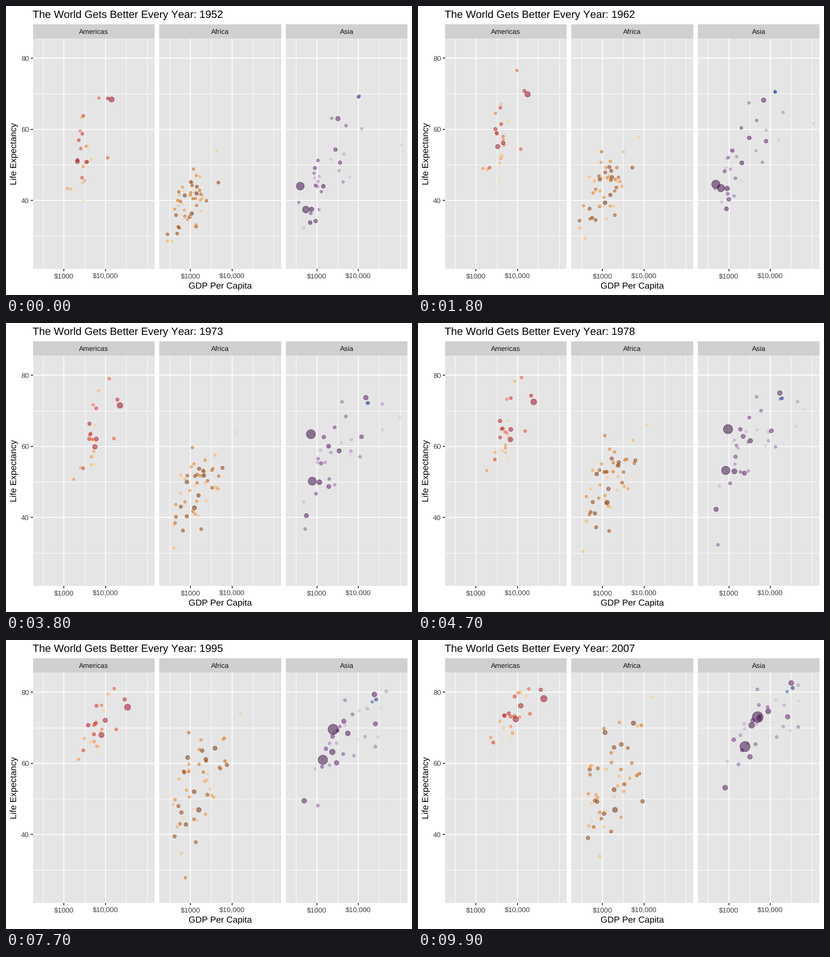
Write a matplotlib script that moves like this. It is 885 px wide and 632 px high and loops after 10000 ms.

```python
import numpy as np
import matplotlib.pyplot as plt
from matplotlib.animation import FuncAnimation
from matplotlib.colors import to_rgb
from matplotlib.patches import Rectangle

W, H, DPI = 885, 632, 64
PT = 72 / DPI  # points per pixel
FRAMES = 100
LEFT, STEP, PANEL_W = 58.5, 275.6, 265.5
TOP, BOTTOM = 71, 575

KEYS = (1952, 1972, 1987, 2007)
WAVES = np.arange(1952, 2008, 5)
time = np.linspace(1952, 2007, FRAMES)
rng = np.random.default_rng(3)

plt.rcParams.update({
    "font.family": "Liberation Sans",
    "text.kerning_factor": 6,
    "text.hinting": "none",
})

# panel index and palette, from most to least populous
AM, AF, AS, OC = range(4)
REGIONS = {
    AM: (0, "#A50026 #D73027 #F46D43 #FDAE61 #FEE090"),
    AF: (1, "#7F3B08 #B35806 #E08214 #FDB863 #FEE0B6"),
    AS: (2, "#40004B #762A83 #9970AB #C2A5CF #E7D4E8"),
    OC: (2, "#313695 #4575B4"),
}


def x_pos(log_gdp, panel=0):
    return 126.3 + STEP * panel + 90.6 * (log_gdp - 3)


def y_pos(life):
    return 425 - 7.768 * (life - 40)


dots = []


def add(region, pops, years, log_gdp, life):
    x = np.interp(time, years, x_pos(log_gdp, REGIONS[region][0]))
    y = np.interp(time, years, y_pos(life))
    r = 2.49 + 9.33 * np.interp(time, (1952, 2007), np.sqrt(np.array(pops) / 1319))
    dots.append((region, pops[1], x, y, r))


def track(region, pops, *points):
    """A dot with its own path through (year, GDP, life) points."""
    years, gdp, life = np.array(points).T
    add(region, pops, years, np.log10(gdp), life)


def drift(n, keep):
    """Standard normal traits that wander a little from wave to wave."""
    z = rng.standard_normal(n)
    rows = []
    for _ in WAVES:
        z = (z - z.mean()) / z.std()
        rows.append(z)
        z = keep * z + np.sqrt(1 - keep ** 2) * rng.standard_normal(n)
    return np.array(rows)


def crowd(region, n, corr, pop, growth, gdp, gdp_sd, life, life_sd, limits):
    """A cloud whose centre, spread and tilt follow the region's trend."""
    def trend(v):
        return np.interp(WAVES, KEYS, v)[:, None]

    u, v = drift(n, 0.98), drift(n, 0.985)
    x = np.clip(trend(gdp) + trend(gdp_sd) * u, *limits)
    y = trend(life) + trend(life_sd) * (corr * u + np.sqrt(1 - corr ** 2) * v)
    y = np.clip(y, 28.5, 82)
    for i in range(n):
        size = 10 ** (np.log10(pop) + 0.45 * rng.standard_normal())
        add(region, (size / growth, size), WAVES, x[:, i], y[:, i])


crowd(AM, 21, 0.55, 8, 2.7, (3.48, 3.69, 3.74, 3.87), (0.2, 0.2, 0.2, 0.25),
      (52.6, 61.8, 67.6, 73.1), (8.6, 7, 5.5, 4), (3.08, 4.3))
crowd(AF, 48, 0.5, 8.5, 3.2, (2.97, 3.15, 3.13, 3.18), (0.26, 0.33, 0.38, 0.43),
      (39.1, 47.5, 53.3, 54.8), (5.2, 6.2, 7.8, 9.4), (2.45, 4.2))
crowd(AS, 27, 0.75, 20, 2.9, (3.22, 3.45, 3.65, 3.8), (0.34, 0.47, 0.48, 0.52),
      (46.5, 57.3, 65, 70.5), (8.6, 9, 7.5, 7.8), (2.52, 4.67))

track(AM, (158, 301), (1952, 13990, 68.4), (1972, 21806, 71.3), (2007, 42952, 78.2))
track(AM, (15, 33), (1952, 11367, 68.7), (1972, 18971, 72.9), (2007, 36319, 80.7))
track(AM, (57, 190), (1952, 2109, 50.9), (1977, 6660, 61.5), (2007, 9066, 72.4))
track(AM, (30, 109), (1952, 3478, 50.8), (1987, 8688, 69.5), (2007, 11978, 76.2))

track(AF, (33, 135), (1952, 1077, 36.3), (1987, 1385, 46.9), (2007, 2014, 46.9))
track(AF, (22, 80), (1952, 1419, 41.9), (1972, 2024, 51.1), (2007, 5581, 71.3))
track(AF, (14, 44), (1952, 4725, 45), (1992, 7225, 61.9), (2007, 9270, 49.3))
track(AF, (2.5, 8.9), (1952, 493, 40), (1982, 882, 46.2), (1992, 737, 23.6), (2007, 863, 46.2))

track(AS, (556, 1319), (1952, 400, 44), (1962, 488, 44.5), (1972, 677, 63.1), (2007, 4959, 73))
track(AS, (372, 1110), (1952, 547, 37.4), (1987, 977, 58.6), (2007, 2452, 64.7))
track(AS, (82, 223), (1952, 750, 37.5), (1972, 1111, 49.2), (2007, 3541, 70.7))
track(AS, (86, 127), (1952, 3217, 63), (1972, 14779, 73.4), (2007, 31656, 82.6))
track(AS, (0.2, 2.5), (1952, 108382, 55.6), (1972, 109348, 67.7), (1987, 28118, 74.2),
      (2007, 47307, 77.6))
track(AS, (4.7, 14), (1952, 368, 39.4), (1967, 523, 45.4), (1977, 525, 31.2), (2007, 1714, 59.7))

track(OC, (8.7, 20.4), (1952, 10040, 69.1), (1972, 16789, 71.9), (2007, 34435, 81.2))
track(OC, (2, 4.1), (1952, 10557, 69.4), (1972, 16046, 71.9), (2007, 25185, 80.2))


def ramp(palette, n):
    stops = np.array([to_rgb(c) for c in palette.split()]) ** 1.22
    at = np.linspace(0, len(stops) - 1, n)
    return np.stack([np.interp(at, range(len(stops)), ch) for ch in stops.T], 1)


def dot_colors():
    """Half-transparent colours, darkest for the largest population."""
    region = np.array([d[0] for d in dots])
    pops = np.array([d[1] for d in dots])
    rgba = np.full((len(dots), 4), 0.5)
    for key, (_, palette) in REGIONS.items():
        mine = np.flatnonzero(region == key)
        order = mine[np.argsort(-pops[mine])]
        rgba[order, :3] = ramp(palette, len(mine))
    return rgba


fig = plt.figure(figsize=(W / DPI, H / DPI), dpi=DPI, facecolor="white")
ax = fig.add_axes([0, 0, 1, 1])
ax.set(xlim=(0, W), ylim=(H, 0))
ax.axis("off")


def rect(x, y, w, h, color):
    ax.add_patch(Rectangle((x, y), w, h, fc=color, lw=0, zorder=0))


def line(x, y, width, color="white"):
    ax.plot(x, y, color=color, lw=width * PT, solid_capstyle="butt", zorder=1)


def label(x, y, s, size, color="black", ha="center", **kw):
    return ax.text(x, y, s, fontsize=size * PT, color=color, ha=ha,
                   va="baseline", parse_math=False, **kw)


TICK, GREY = "#2b2b2b", "#404040"
for i, name in enumerate(("Americas", "Africa", "Asia")):
    x0 = LEFT + STEP * i
    x1 = x0 + PANEL_W
    rect(x0, 40, PANEL_W, TOP - 40, "#d0d0d0")
    rect(x0, TOP, PANEL_W, BOTTOM - TOP, "#e5e5e5")
    label((x0 + x1) / 2, 62.3, name, 15.4, "#151515")
    for life in (30, 50, 70):
        line((x0, x1), [y_pos(life)] * 2, 1)
    for power in (2.5, 3.5, 4.5, 5):
        line([x_pos(power, i)] * 2, (TOP, BOTTOM), 1)
    for life in (40, 60, 80):
        line((x0, x1), [y_pos(life)] * 2, 1.9)
    for power, text in ((3, "$1000"), (4, "$10,000")):
        x = x_pos(power, i)
        line((x, x), (TOP, BOTTOM), 1.9)
        line((x, x), (BOTTOM, BOTTOM + 4.8), 1.9, TICK)
        label(x, 595.5, text, 15.4, GREY)

for life in (40, 60, 80):
    y = y_pos(life)
    line((LEFT - 4.8, LEFT), (y, y), 1.9, TICK)
    label(50, y + 5.5, str(life), 15.4, GREY, "right")

label(466.8, 618, "GDP Per Capita", 19.25)
label(23.5, 323, "Life Expectancy", 19.25, rotation=90, rotation_mode="anchor")
title = label(58, 26.6, "", 23.1, ha="left")

X, Y, R = (np.array([d[k] for d in dots]) for k in (2, 3, 4))
rgba = dot_colors()
cloud = ax.scatter(X[:, 0], Y[:, 0], s=1, facecolors=rgba, edgecolors=rgba,
                   linewidths=1.2 * PT, zorder=3)


def draw(k):
    cloud.set_offsets(np.column_stack([X[:, k], Y[:, k]]))
    cloud.set_sizes((2 * R[:, k] * PT) ** 2)
    title.set_text(f"The World Gets Better Every Year: {round(time[k])}")
    return cloud, title


anim = FuncAnimation(fig, draw, frames=FRAMES, interval=100, repeat=True, repeat_delay=0)
plt.show()
```
